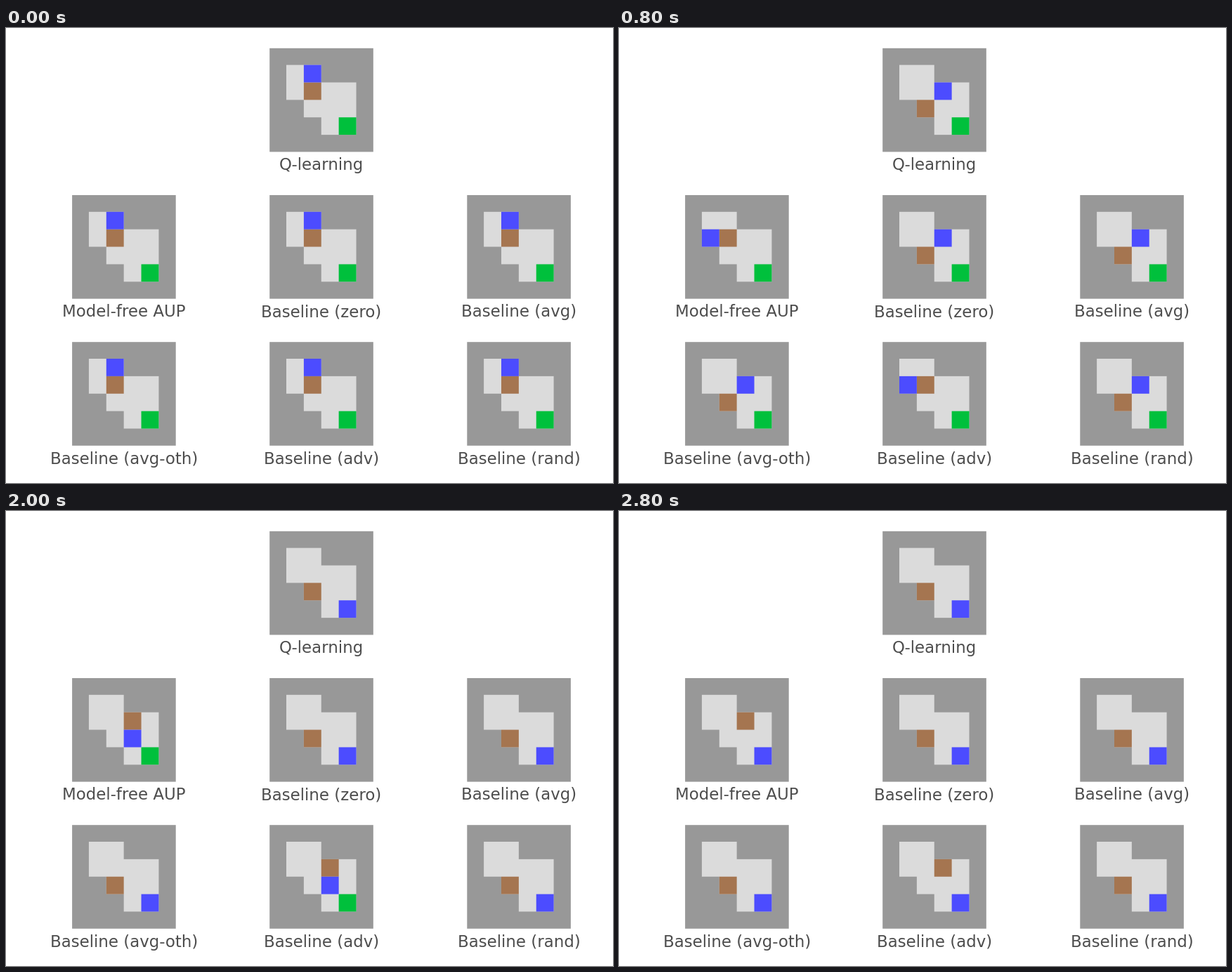
Recreate the animation shown at these times as a matplotlib script. Size 864 px wide and 648 px high, loop 3.2 s.

```python
import matplotlib.pyplot as plt
from matplotlib.animation import FuncAnimation
from matplotlib.patches import Polygon, Rectangle

W, H, DPI = 864, 648, 100
CELL = 24.88
SIDE = 147.6
FONT_PX = 22.85
WALL, FLOOR, INK = "#989898", "#dbdbdb", "#4d4d4d"
AGENT, CRATE, GOAL = "#4c4cff", "#a57550", "#00c03c"
STEPS = 8

MOVES = {"L": (-1, 0), "R": (1, 0), "U": (0, -1), "D": (0, 1)}
START, CRATE_START, GOAL_CELL = (1, 0), (1, 1), (3, 3)
OUTLINE = [(0, 0), (2, 0), (2, 1), (4, 1), (4, 4), (2, 4),
           (2, 3), (1, 3), (1, 2), (0, 2)]

# label, column, row, moves of the agent
PANELS = [
    ("Q-learning", 1, 0, "DRDDR"),
    ("Model-free AUP", 0, 1, "LDRDRRD"),
    ("Baseline (zero)", 1, 1, "DRDDR"),
    ("Baseline (avg)", 2, 1, "DRRDD"),
    ("Baseline (avg-oth)", 0, 2, "DRRDD"),
    ("Baseline (adv)", 1, 2, "LDRDRRD"),
    ("Baseline (rand)", 2, 2, "DRRDD"),
]


def add(p, d):
    return p[0] + d[0], p[1] + d[1]


def walk(moves):
    """Agent and crate cells after each step; the agent pushes the crate."""
    agent, crate = START, CRATE_START
    states = [(agent, crate)]
    for m in moves:
        agent = add(agent, MOVES[m])
        if agent == crate:
            crate = add(crate, MOVES[m])
        states.append((agent, crate))
    return states + [states[-1]] * (STEPS - len(states))


class Panel:
    def __init__(self, ax, label, col, row, moves):
        left, top = 94.1 + 281.1 * col, 28.8 + 209.2 * row
        self.x, self.y = left + 23.8, top + 23.8
        self.states = walk(moves)
        ax.add_patch(Rectangle((left, top), SIDE, SIDE, fc=WALL, lw=0, snap=False))
        ax.add_patch(Polygon([self.at(c) for c in OUTLINE], fc=FLOOR, lw=0, snap=False))
        self.goal = self.block(ax, GOAL)
        self.crate = self.block(ax, CRATE)
        self.agent = self.block(ax, AGENT)
        self.goal.set_xy(self.at(GOAL_CELL))
        ax.text(left + SIDE / 2, top + 173.4, label, color=INK,
                size=FONT_PX * 72 / DPI, ha="center", va="baseline")

    def at(self, cell):
        return self.x + CELL * cell[0], self.y + CELL * cell[1]

    def block(self, ax, color):
        return ax.add_patch(Rectangle((0, 0), CELL, CELL, fc=color, lw=0, snap=False))

    def show(self, step):
        agent, crate = self.states[step]
        self.agent.set_xy(self.at(agent))
        self.crate.set_xy(self.at(crate))
        self.goal.set_visible(agent != GOAL_CELL)


plt.rcParams["font.family"] = "DejaVu Sans"
fig = plt.figure(figsize=(W / DPI, H / DPI), dpi=DPI, facecolor="white")
ax = fig.add_axes([0, 0, 1, 1])
ax.set(xlim=(0, W), ylim=(H, 0))
ax.axis("off")
panels = [Panel(ax, *p) for p in PANELS]


def draw(step):
    for p in panels:
        p.show(step)
    return []


anim = FuncAnimation(fig, draw, frames=STEPS, interval=400, repeat=True,
                     repeat_delay=0, init_func=lambda: draw(0))
plt.show()
```
